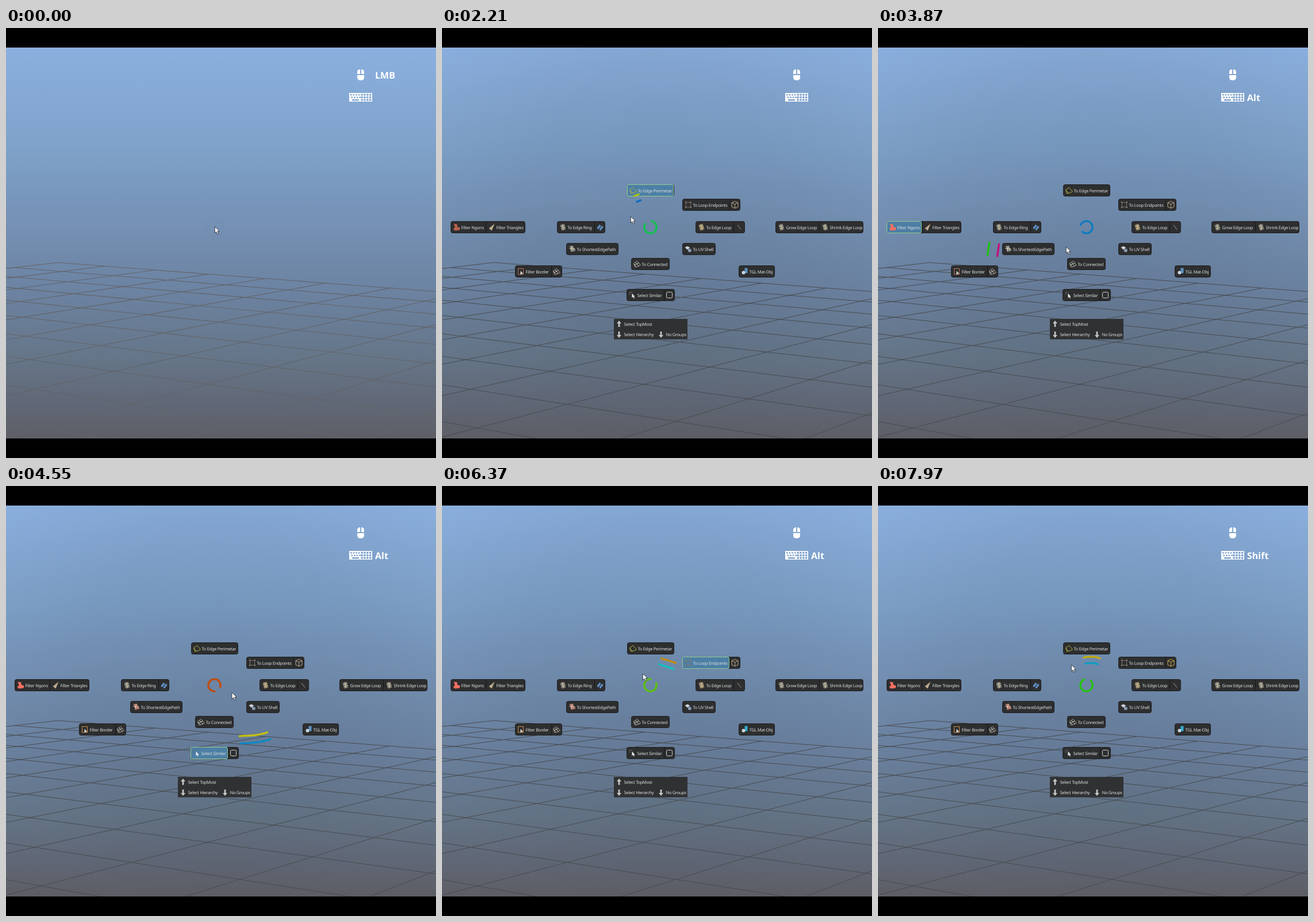
Recreate the animation shown at these times as an HTML page. Size 748x748 px, loop 8000 ms.

```html
<!DOCTYPE html>
<html lang="en">
<head>
<meta charset="utf-8">
<title>Radial selection menu</title>
<style>
  html, body { margin: 0; width: 100%; height: 100%; overflow: hidden; background: #000; }
  svg { display: block; width: 100vw; height: 100vh; }
  text { font-family: "Noto Sans", "Open Sans", sans-serif; text-rendering: geometricPrecision; }
  .label { font-size: 7.5px; letter-spacing: -.3px; fill: #dcdcdc; }
  .key { font-size: 16px; font-weight: 700; fill: #fff; }
  .ribbon { fill: none; stroke-width: 3.4; stroke-linecap: round; stroke-linejoin: round; }
</style>
</head>
<body>
<svg id="stage" viewBox="0 0 748 748">
  <defs>
    <linearGradient id="sky" x1="0" y1="0" x2="0" y2="1">
      <stop offset="0" stop-color="#8bb0df"/>
      <stop offset=".25" stop-color="#7fa2ca"/>
      <stop offset=".45" stop-color="#7591b4"/>
      <stop offset=".62" stop-color="#6c83a2"/>
      <stop offset=".8" stop-color="#657587"/>
      <stop offset=".9" stop-color="#616978"/>
      <stop offset="1" stop-color="#5e5f66"/>
    </linearGradient>
    <radialGradient id="shade" gradientUnits="userSpaceOnUse" cx="374" cy="300" r="450">
      <stop offset="0" stop-opacity=".08"/>
      <stop offset=".5" stop-opacity=".06"/>
      <stop offset="1" stop-opacity=".01"/>
    </radialGradient>
    <clipPath id="view"><rect y="34" width="748" height="680"/></clipPath>
  </defs>
  <rect width="748" height="748"/>
  <g clip-path="url(#view)">
    <rect y="34" width="748" height="680" fill="url(#sky)"/>
    <path id="gridLight" fill="none" stroke="#626469" stroke-width="1.1"/>
    <g id="dim">
      <rect y="34" width="748" height="680" fill="url(#shade)"/>
      <path id="gridDark" fill="none" stroke="#474a4f" stroke-width=".95"/>
    </g>
  </g>
  <g fill="#fff">
    <path d="M616 72v8h-5v-3q0-5 5-5zM618 72v8h5v-3q0-5-5-5zM611 82h12v4q0 5-6 5t-6-5z"/>
    <path id="board" fill-rule="evenodd"/>
  </g>
  <text id="lmb" class="key" x="642" y="88">LMB</text>
  <text id="mod" class="key" x="642" y="127"></text>
  <g id="menu"></g>
  <path id="ribbonL" class="ribbon"/>
  <path id="ribbonR" class="ribbon"/>
  <circle id="halo" cx="363" cy="347" r="15" fill="none" stroke="#6d8bb2" stroke-width="2" opacity=".3"/>
  <path id="ring" fill="none" stroke-width="3.4"/>
  <path id="pointer" d="M0 0V11.2L2.7 8.8L4.6 13L6.6 12.1L4.7 8H8.2Z" fill="#fff" stroke="#2c3138" stroke-width=".9"/>
</svg>
<script>
const LOOP = 8000, CX = 362.5, CY = 346.5, RAD = Math.PI / 180;
const $ = id => document.getElementById(id);

function add(parent, tag, attrs, text) {
  const el = document.createElementNS('http://www.w3.org/2000/svg', tag);
  for (const k in attrs) el.setAttribute(k, attrs[k]);
  if (text) el.textContent = text;
  parent.appendChild(el);
  return el;
}

// Floor grid: a far corner and two vanishing points
const CORNER = [90, 408], VANISH_U = [-2750, 190], VANISH_V = [2000, 188];
function floor(u, v) {
  const gu = .0282 * u, gv = .038 * v;
  return CORNER.map((c, k) => ((c - gu * VANISH_U[k] - gv * VANISH_V[k]) / (1 - gu - gv)).toFixed(1));
}
let grid = '';
for (let i = 0; i <= 12; i++) {
  grid += `M${floor(i, 0)}L${floor(i, 11)}`;
  if (i < 12) grid += `M${floor(0, i)}L${floor(12, i)}`;
}
$('gridLight').setAttribute('d', grid);
$('gridDark').setAttribute('d', grid);

// Keyboard symbol: a white plate with key holes
let board = 'M597 113h40v15h-40zM602 124h12v2.6h-12z';
for (let r = 0; r < 3; r++)
  for (let c = 0; c < 4; c++) {
    board += `M${617.5 + c * 4.8} ${114.5 + r * 4.5}h3.4v3.2h-3.4z`;
    if (r < 2) board += `M${599 + c * 4.6 + r * 1.5} ${115 + r * 4.5}h2.6v2.6h-2.6z`;
  }
$('board').setAttribute('d', board);

// Icon parts: path, colour, filled; "hot" recolours the first part once visited
const MESH = [['M-5-4L2-6L5 4L-2 6Z', '#8d7c5c', 1], ['M-4-1L3-3M-3 3L4 0M-1-5L1 5', '#d8ccb0']];
const SHEET = [['M-6-1L0-5L6 2L-1 5ZM-6-1L-4 5L-1 5', '#a9a49a']];
const ICONS = {
  sheet: { parts: SHEET, hot: '#b0b043' },
  mesh: { parts: MESH },
  gray: { parts: [[MESH[0][0], '#77776f', 1], MESH[1]] },
  path: { parts: [['M-5-5L1-6L6 3L-1 5Z', '#8a8a80', 1], ['M-5-1L5 0M-2 4L0-5', '#ddd5c8']], hot: '#b0756a' },
  frame: { parts: [['M-4-4H4V4H-4Z', '#7b7368'], ['M-5.5-5.5h2v2h-2zM3.5-5.5h2v2h-2zM-5.5 3.5h2v2h-2zM3.5 3.5h2v2h-2z', '#8f8070', 1]] },
  cube: { parts: [['M0-6L5.5-3.5V3.5L0 6L-5.5 3.5V-3.5ZM-5.5-3.5L0-1L5.5-3.5M0-1V6', '#b9a58b']], hot: '#c9a845' },
  bars: { parts: [['M-5 1L0-5L2-2L-3 4ZM-1 4L4-3L6 0L1 6Z', '#5f8fc4', 1]] },
  slash: { parts: [['M-3-4L3 4', '#a59b92']] },
  ngon: { parts: [['M-5-6L1-5L1-1L6 1L5 5L-3 6L-6 3L-3 0Z', '#b9604f', 1]], hot: '#f0705f' },
  tri: { parts: [['M5-6L0 6L-5 2Z', '#bca98c', 1]] },
  shell: { parts: [['M-6-3L-1-5L3-2L-2 1Z', '#cfd3da', 1], ['M-1 0L5 0L5 5L0 5Z', '#8ea0bd', 1]] },
  link: { parts: [...SHEET, ['M-3-3L3 4M-5 2L3-2', '#cfcac0']] },
  border: { parts: [['M-5-5H4V5H-5Z', '#b8705c'], ['M-1-1L4 4L1 4L-1 6Z', '#ddd', 1]], hot: '#d09048' },
  mat: { parts: [['M0-6H5V3H0Z', '#5c93c4', 1], ['M-5 2a3 3 0 1 0 6 0a3 3 0 1 0-6 0', '#ccd6dc', 1]], hot: '#35a9cf' },
  pick: { parts: [['M-5-5H0M-5-5V0', '#666'], ['M-1-3V5L1 3L2 6L3.5 5L2 3H4Z', '#eee', 1]] },
  box: { parts: [['M-3-5H3Q5-5 5-3V3Q5 5 3 5H-3Q-5 5-5 3V-3Q-5-5-3-5Z', '#cfcfcf']] },
  up: { parts: [['M0-6L4-1H1.4V5H-1.4V-1H-4Z', '#c4c4c4', 1]] },
  down: { parts: [['M0 6L4 1H1.4V-5H-1.4V1H-4Z', '#c4c4c4', 1]] }
};

// Buttons: left, top, then segments [width, icon, label]
const BUTTONS = [
  [322.5, 272.5, [81, 'sheet', 'To Edge Perimetar']],
  [418.5, 297.5, [82, 'frame', 'To Loop Endpoints'], [18, 'cube']],
  [15.5, 336.5, [61, 'ngon', 'Filter Ngons'], [68, 'tri', 'Filter Triangles']],
  [200.5, 336.5, [65, 'gray', 'To Edge Ring'], [18, 'bars']],
  [441.5, 336.5, [66, 'mesh', 'To Edge Loop'], [19, 'slash']],
  [580.5, 336.5, [76, 'gray', 'Grow Edge Loop'], [76, 'gray', 'Shrink Edge Loop']],
  [216.5, 374.5, [90, 'path', 'To ShortestEdgePath']],
  [418.5, 374.5, [57, 'shell', 'To UV Shell']],
  [329.5, 400.5, [66, 'link', 'To Connected']],
  [127.5, 413.5, [63, 'border', 'Filter Border'], [18, 'link']],
  [516.5, 413.5, [62, 'mat', 'TGL Mat-Obj']],
  [321.5, 454.5, [65, 'pick', 'Select Similar'], [18, 'box']]
];

function drawIcon(parent, name, x, y) {
  const g = add(parent, 'g', { transform: `translate(${x} ${y})` });
  return ICONS[name].parts.map(([d, color, solid]) =>
    add(g, 'path', { d, fill: solid ? color : 'none', stroke: solid ? 'none' : color }))[0];
}

const menu = $('menu'), segs = {};
for (const [x, y, ...parts] of BUTTONS) {
  const width = parts.reduce((sum, p) => sum + p[0], 0);
  add(menu, 'rect', { x, y, width, height: 20, rx: 3, fill: '#2d2e2f', stroke: '#1e1f21' });
  let left = x;
  for (const [w, icon, label] of parts) {
    if (left > x) add(menu, 'path', { d: `M${left} ${y}v20`, stroke: '#17181a' });
    const glow = add(menu, 'rect', { x: left, y, width: w - 1, height: 20, rx: 2, fill: '#4c7fa5', stroke: '#93c98e' });
    const mark = drawIcon(menu, icon, left + (label ? 10 : w / 2), y + 10);
    if (label) add(menu, 'text', { class: 'label', x: left + 18, y: y + 13.2 }, label);
    segs[label || icon] = { glow, mark, hot: ICONS[icon].hot, base: ICONS[icon].parts[0] };
    left += w;
  }
}
add(menu, 'rect', { x: 299, y: 506, width: 128, height: 35.5, fill: '#303133' });
for (const [icon, x, y, label] of [['up', 308, 515, 'Select TopMost'], ['down', 308, 533, 'Select Hierarchy'], ['down', 381, 533, 'No Groups']]) {
  drawIcon(menu, icon, x, y);
  add(menu, 'text', { class: 'label', x: x + 8.5, y: y + 3.2 }, label);
}

// Which segment is lit from a given time on
const LIT = [
  [1440, 'To Edge Loop'], [1700, 'To Loop Endpoints'], [1950, 'To Edge Perimetar'],
  [2330, 'To Edge Ring'], [2560, ''], [2780, 'To Connected'],
  [3060, 'To UV Shell'], [3300, 'To Edge Loop'], [3500, ''], [3640, 'Filter Ngons'],
  [3900, 'To ShortestEdgePath'], [4060, 'Filter Border'], [4300, 'Select Similar'],
  [4640, ''], [4710, 'TGL Mat-Obj'], [4900, 'Grow Edge Loop'], [5080, ''],
  [5320, 'Filter Ngons'], [5640, 'Filter Border'], [5800, 'Select Similar'],
  [6000, 'TGL Mat-Obj'], [6140, 'Grow Edge Loop'], [6310, 'To Loop Endpoints'],
  [6480, 'To Edge Perimetar'], [6640, 'To Edge Ring'], [6780, ''], [7240, 'slash'],
  [7420, 'cube'], [7560, ''], [7840, 'slash'], [7900, 'cube'], [7960, '']
];

// Polar keys around the ring: time, angle (counter-clockwise), radius
const TRAIL = [
  [1400, 0, 4], [1520, 2, 45], [1750, 40, 55], [2000, 85, 55], [2250, 125, 56],
  [2480, 180, 62], [2950, 275, 58], [3140, 316, 52], [3190, 335, 59], [3450, 415, 70],
  [3750, 535, 150], [4050, 575, 180], [4320, 612, 110], [4500, 655, 105], [4550, 677, 129],
  [4800, 708, 150], [5000, 750, 135], [5250, 835, 104], [5460, 900.5, 196], [5510, 908, 191],
  [5760, 975, 115], [6000, 1035, 150], [6200, 1075, 90], [6320, 1118, 54], [6370, 1147, 45],
  [6700, 1290, 60], [7100, 1470, 57], [7500, 1670, 58], [7920, 1862, 47], [7970, 1894, 43],
  [8000, 1910, 42]
];
const POINTER = [
  [1400, 10, 1], [1520, 30, 28], [2000, 112, 37], [2480, 206, 40], [2950, 316, 38],
  [3190, 371, 36], [3750, 565, 48], [4050, 600, 48], [4550, 697, 33], [5000, 782, 40],
  [5510, 932, 47], [6000, 1080, 36], [6370, 1203, 24], [6700, 1320, 36], [7100, 1500, 38],
  [7500, 1697, 40], [7970, 1926, 44], [8000, 1938, 44]
];

// Smooth interpolation with finite-difference tangents
function sample(keys, t) {
  const last = keys.length - 1;
  t = Math.min(Math.max(t, keys[0][0]), keys[last][0]);
  let i = 0;
  while (i < last - 1 && keys[i + 1][0] <= t) i++;
  const a = keys[i], b = keys[i + 1], p = keys[Math.max(i - 1, 0)], n = keys[Math.min(i + 2, last)];
  const h = b[0] - a[0], s = (t - a[0]) / h, s2 = s * s, s3 = s2 * s;
  return [1, 2].map(k => {
    const ma = (b[k] - p[k]) / (b[0] - p[0]) * h, mb = (n[k] - a[k]) / (n[0] - a[0]) * h;
    return (2 * s3 - 3 * s2 + 1) * a[k] + (s3 - 2 * s2 + s) * ma + (3 * s2 - 2 * s3) * b[k] + (s3 - s2) * mb;
  });
}
const polar = ([ang, r]) => [CX + r * Math.cos(ang * RAD), CY - r * Math.sin(ang * RAD)];

// Colour wheel by direction
const WHEEL = [[0, 54], [100, 130], [180, 194], [214, 218], [280, 363], [360, 414]];
function tint(angle) {
  const a = (angle % 360 + 360) % 360;
  const i = WHEEL.findIndex(w => w[0] > a), [a0, h0] = WHEEL[i - 1], [a1, h1] = WHEEL[i];
  return `hsl(${((h0 + (a - a0) / (a1 - a0) * (h1 - h0)) % 360).toFixed(1)},85%,41%)`;
}

function drawRibbons(t) {
  const on = t > 1430;
  for (const id of ['ribbonL', 'ribbonR']) $(id).style.display = on ? '' : 'none';
  if (!on) return;
  const sides = [[], []], at = time => polar(sample(TRAIL, time));
  const gap = Math.max(5.5, sample(TRAIL, t)[1] * .05);
  for (let i = 0; i <= 6; i++) {
    const time = t - 50 + i * 50 / 6;
    const [x, y] = at(time), [x0, y0] = at(time - 6), [x1, y1] = at(time + 6);
    const dx = x1 - x0, dy = y1 - y0, len = Math.hypot(dx, dy) || 1;
    [1, -1].forEach((side, k) =>
      sides[k].push(`${(x + side * gap * dy / len).toFixed(2)} ${(y - side * gap * dx / len).toFixed(2)}`));
  }
  const [x0, y0] = at(t - 50), [x1, y1] = at(t);
  const heading = Math.atan2(y0 - y1, x1 - x0) / RAD;
  ['ribbonL', 'ribbonR'].forEach((id, k) => {
    $(id).setAttribute('d', 'M' + sides[k].join('L'));
    $(id).setAttribute('stroke', tint(heading + 180 * k));
  });
}

function drawRing(t) {
  const angle = sample(TRAIL, t - 25)[0];
  const half = t < 1410 ? .1 : 27;
  const from = polar([angle + half, 10.6]), to = polar([angle - half, 10.6]);
  $('ring').setAttribute('d', `M${from}A10.6 10.6 0 1 0 ${to}`);
  $('ring').setAttribute('stroke', tint(angle));
}

function render(t) {
  const open = Math.min(Math.max((t - 600) / 300, 0), 1);
  for (const id of ['dim', 'menu', 'ring']) $(id).setAttribute('opacity', open);
  $('gridLight').setAttribute('opacity', 1 - open);
  $('halo').style.display = t < 600 ? '' : 'none';
  $('lmb').setAttribute('opacity', t < 60 || t >= 600 && t < 1240 ? 1 : 0);
  $('mod').textContent = t < 3500 ? '' : t < 6780 ? 'Alt' : 'Shift';

  const past = LIT.filter(e => e[0] <= t).map(e => e[1]);
  const lit = past[past.length - 1];
  for (const name in segs) {
    const { glow, mark, hot, base } = segs[name];
    glow.style.display = name === lit ? '' : 'none';
    if (hot) mark.setAttribute(base[2] ? 'fill' : 'stroke', past.includes(name) ? hot : base[1]);
  }

  drawRing(t);
  drawRibbons(t);
  const [x, y] = t < 1400 ? [363.3, 345.7] : polar(sample(POINTER, t));
  $('pointer').setAttribute('transform', `translate(${x.toFixed(2)} ${y.toFixed(2)})`);
}

const start = performance.now();
function tick() {
  render((performance.now() - start) % LOOP);
  requestAnimationFrame(tick);
}
tick();
</script>
</body>
</html>
```
